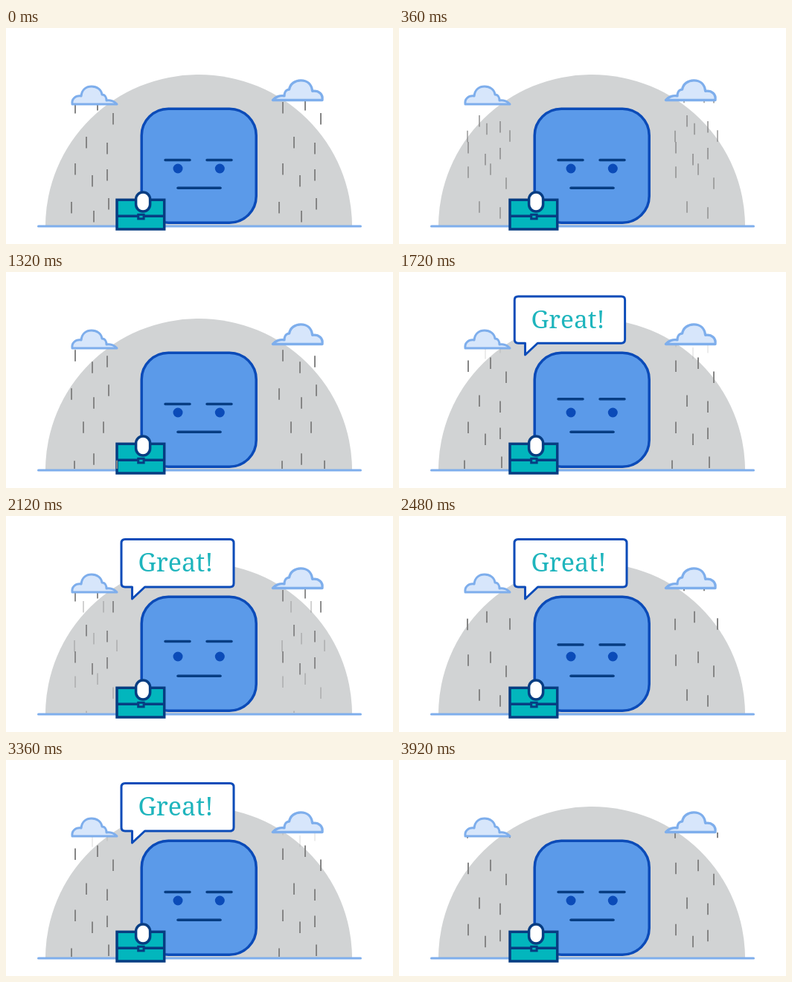
Recreate the animation shown at these times as an HTML page. Size 520 by 292 pixels, loop 3960 ms.

```html
<!DOCTYPE html>
<html lang="en">
<head>
<meta charset="utf-8">
<title>Rainy day</title>
<style>
  html, body { margin: 0; width: 100%; height: 100%; overflow: hidden; background: #fff; }
  svg { display: block; width: 100vw; height: 100vh; }
  .line { fill: none; stroke-linecap: round; }
  .cloud { fill: #d7e6fb; stroke: #7eaeec; stroke-width: 3; stroke-linejoin: round; }
  .cloud path { vector-effect: non-scaling-stroke; }
  .navy { stroke: #073d82; stroke-width: 3.5; }
  .rain { fill: none; stroke: #858585; stroke-width: 2; }
  text { font: 34px "Roboto Slab", "Noto Serif", serif; fill: #1fb5bd; text-anchor: middle; }
</style>
</head>
<body>
<svg viewBox="0 0 520 292">
  <defs>
    <path id="cloud" d="M89 103C88 96 93 91 101 92C102 83 108 79 115 79C122 79 128 83 129 90C133 90 135 94 135 98C140 97 146 99 149 103Z"/>
    <clipPath id="clipL"><rect x="80" y="104" width="80" height="162"/></clipPath>
    <clipPath id="clipR"><rect x="355" y="98" width="85" height="168"/></clipPath>
  </defs>

  <path d="M53 268A206 205 0 0 1 465 268Z" fill="#d1d3d4"/>
  <path class="line" d="M43.5 268H476.5" stroke="#7eaeec" stroke-width="3"/>

  <rect x="182.2" y="109.2" width="154" height="154" rx="36" fill="#5b9ae9" stroke="#0b4bb8" stroke-width="3.5"/>
  <g fill="#0b4bb8"><circle cx="231" cy="190" r="6.5"/><circle cx="287.3" cy="190" r="6.5"/></g>
  <path id="brows" class="line navy" d="M214 178.5H247M270 178.5H303"/>
  <path class="line navy" d="M231 216.3H288"/>

  <g class="navy" fill="#02b6bd">
    <rect x="149" y="232.3" width="63.7" height="39.7"/>
    <path d="M149 254.3H212.7"/>
    <rect x="177.7" y="252.3" width="7.4" height="5.6" stroke-width="3"/>
    <rect x="174.6" y="222" width="19" height="26" rx="9.5" fill="#fff"/>
  </g>

  <g id="rainL" class="rain" clip-path="url(#clipL)"></g>
  <g id="rainR" class="rain" clip-path="url(#clipR)"></g>
  <g class="cloud">
    <use href="#cloud"/>
    <use href="#cloud" transform="translate(425 97.5) scale(-1.11 1.11) translate(-89 -103)"/>
  </g>

  <g id="bubble">
    <path d="M160 31.5H301Q306 31.5 306 36.5V91Q306 96 301 96H186.5L169.5 112V96H160Q155 96 155 91V36.5Q155 31.5 160 31.5Z" fill="#fff" stroke="#0b4bb8" stroke-width="3" stroke-linejoin="round"/>
    <text x="228" y="75">Great!</text>
  </g>
</svg>
<script>
const LOOP = 3960, STEP = 40;
const SPAN = 281.5, SPAN_MS = 1160;   // height of the drop pattern and its travel time
const SHOWER = 1640, LAYERS = 4;      // a new shower follows the last one
const DROP = 15.5;

const drops = [
  [93, 100], [123, 96], [144, 115], [108, 147], [136, 155], [93, 183], [116, 199], [136, 191],
  [92, 51.5], [118, 41.5], [149, 51], [104, -1.5], [131, -1.5], [88, -46.5], [138, -51.5], [118, -34.5]
];

// [time, value] steps
const browSteps = [[1600, 0], [1760, -9], [2400, -9], [2560, 0]];
const popSteps = [[1520, 0], [1680, 0.94], [1760, 1.025], [1880, 1], [3440, 1], [3520, 1.025], [3600, 0.94], [3760, 0]];
const fadeSteps = [[-480, 0], [40, 1], [1360, 1], [1800, 0]];

const $ = id => document.getElementById(id);

function valueAt(steps, t) {
  if (t <= steps[0][0]) return steps[0][1];
  for (let i = 1; i < steps.length; i++) {
    const [t0, a] = steps[i - 1], [t1, b] = steps[i];
    if (t < t1) return a + (b - a) * (t - t0) / (t1 - t0);
  }
  return steps[steps.length - 1][1];
}

const rainPath = [0, -SPAN].map(dy =>
  drops.map(([x, y]) => `M${x} ${y + dy}v${DROP}`).join("")).join("");

function addLayer(group) {
  const path = document.createElementNS("http://www.w3.org/2000/svg", "path");
  path.setAttribute("d", rainPath);
  group.appendChild(path);
  return path;
}

const layers = Array.from({ length: LAYERS }, () =>
  [[addLayer($("rainL")), 0], [addLayer($("rainR")), 279]]);

function draw(t) {
  layers.forEach((sides, i) => {
    const phase = t + SPAN_MS - SHOWER * i;
    const y = phase * SPAN / SPAN_MS;
    for (const [path, x] of sides) {
      path.setAttribute("transform", `translate(${x} ${y})`);
      path.setAttribute("opacity", valueAt(fadeSteps, phase));
    }
  });

  $("brows").setAttribute("transform", `translate(0 ${valueAt(browSteps, t)})`);

  const s = valueAt(popSteps, t);
  $("bubble").setAttribute("visibility", s > 0 ? "visible" : "hidden");
  $("bubble").setAttribute("transform", `translate(170 112) scale(${s}) translate(-170 -112)`);
}

const start = performance.now();
function tick() {
  const t = Math.max(0, performance.now() - start) % LOOP;
  draw(Math.floor(t / STEP) * STEP);
  requestAnimationFrame(tick);
}
tick();
</script>
</body>
</html>
```
